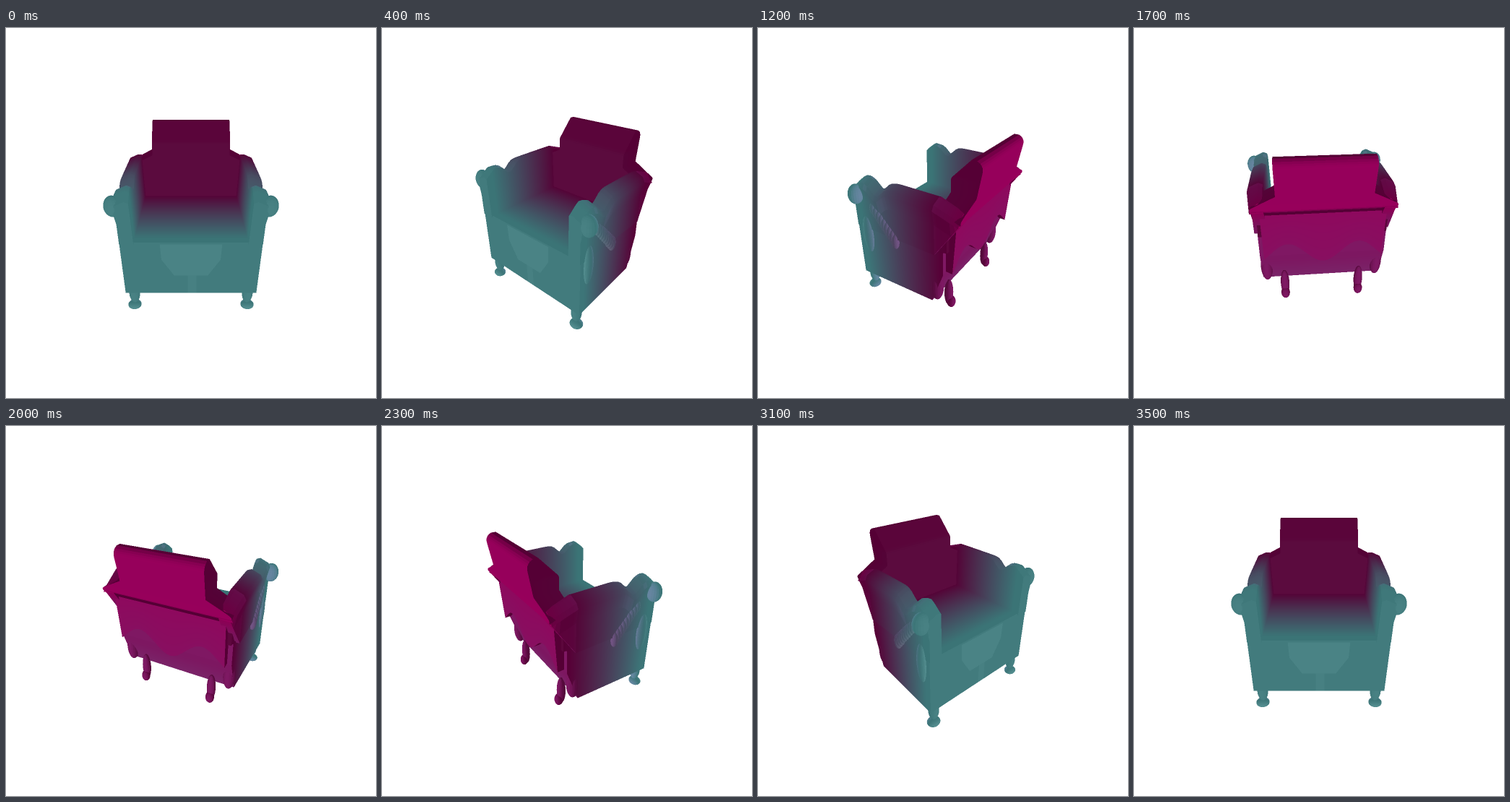
These frames come from a looping animation (512x512 px, 3.6 s). An HTML page with a canvas:

```html
<!DOCTYPE html>
<html lang="en">
<head>
<meta charset="utf-8">
<title>Turning armchair</title>
<style>
html, body { margin: 0; width: 100%; height: 100%; overflow: hidden; background: #fff; }
canvas { display: block; width: 512px; height: 512px; }
</style>
</head>
<body>
<canvas id="stage" width="512" height="512"></canvas>
<script>
const SIZE = 512, SCALE = 2, N = SIZE * SCALE;
const DIST = 450, TILT = Math.PI / 6;
const STEP = 100, STEPS = 36;
const TEAL = [59, 116, 118], MAGENTA = [85, 0, 53];
const triangles = [];

const sub = (a, b) => a.map((v, i) => v - b[i]);
const dot = (a, b) => a[0] * b[0] + a[1] * b[1] + a[2] * b[2];
const cross = (a, b) => [
  a[1] * b[2] - a[2] * b[1], a[2] * b[0] - a[0] * b[2], a[0] * b[1] - a[1] * b[0]
];
const mean = pts => [0, 1, 2].map(k => pts.reduce((s, p) => s + p[k], 0) / pts.length);
const flip = ([x, y, z]) => [-x, y, z];
const ramp = (from, to, v) => Math.min(1, Math.max(0, (v - from) / (to - from)));
const bump = (at, width, v) => Math.exp(-(((v - at) / width) ** 2));
// Evenly spaced values from a to b, both included.
const span = (a, b, count) => Array.from({ length: count + 1 }, (_, i) => a + (b - a) * i / count);

// Teal in front, magenta behind; faces turned backwards glow, recesses there turn purple.
function shade(z, normal, glow) {
  const t = ramp(-50, 66, z);
  const [r, g, b] = MAGENTA.map((m, k) => m + (TEAL[k] - m) * t);
  const back = Math.max(0, -normal[2]);
  const recess = 24 * back * ramp(-72, -56, z);
  const light = Math.max(0, normal[2]) * (7 + glow);
  return [r + 66 * back - recess + light, g + recess + light, b + 38 * back + recess / 3 + light];
}

function addFace(pts, center, glow = 0) {
  let n = cross(sub(pts[2], pts[0]), sub(pts[3] || pts[0], pts[1]));
  const len = Math.hypot(...n);
  if (len < 1e-6) return;
  const sign = dot(n, sub(mean(pts), center)) < 0 ? -1 : 1;
  n = n.map(v => v * sign / len);
  const verts = pts.map(p => ({ p, c: shade(p[2], n, glow) }));
  for (let i = 2; i < verts.length; i++) triangles.push([verts[0], verts[i - 1], verts[i]]);
}

// Skin between consecutive closed rings, with both ends capped.
function loft(rings, glow) {
  const center = mean(rings.flat());
  for (let i = 1; i < rings.length; i++) {
    const a = rings[i - 1], b = rings[i];
    a.forEach((p, j) => {
      const k = (j + 1) % a.length;
      addFace([p, a[k], b[k], b[j]], center, glow);
    });
  }
  addFace(rings[0], center, glow);
  addFace(rings[rings.length - 1], center, glow);
}

function loftPair(rings, glow) {
  loft(rings, glow);
  loft(rings.map(r => r.map(flip)), glow);
}

function blobPair([x, y, z], [rx, ry, rz], glow) {
  loftPair(span(0.03, Math.PI - 0.03, 14).map(a => span(0, Math.PI * 1.9, 19).map(b => [
    x + rx * Math.sin(a) * Math.cos(b), y + ry * Math.cos(a), z + rz * Math.sin(a) * Math.sin(b)
  ])), glow);
}

function buildSeat() {
  loft(span(75, -53, 32).map(z => {
    const w = 85 - 5 * ramp(75, -53, z), lo = -77 + 3 * Math.max(0, -37 - z);
    return [[-w, lo, z], [w, lo, z], [w, 3, z], [-w, 3, z]];
  }));
  const half = [[37, 1, 75.6], [36, -22, 75.6], [21, -47, 75.6]];
  addFace([...half, ...half.map(flip).reverse()], [0, 0, 0], 8);
  addFace([[-4, -47, 75.6], [-4, -76, 75.6], [7, -76, 75.6], [7, -47, 75.6]], [0, 0, 0], 5);
}

function buildArms() {
  loftPair(span(76, -74, 30).map(z => {
    const rear = ramp(-44, -74, z);
    const inner = 69 - 13 * bump(38, 11, z) - 13 * ramp(62, 78, z) - 11 * rear;
    const outer = inner - 7 - 2 * rear;
    const lo = 46 * rear, w = 88 - 4 * rear;
    return [
      [68, lo, z], [69, inner - 2, z], [74, inner, z], [w - 3, outer + 2, z],
      [w, outer - 4, z], [w - 3, Math.max(lo, outer - 22), z], [w - 3, lo, z]
    ];
  }));
  blobPair([89, 48, 68], [10, 13, 9], 6);
  blobPair([84, -10, 60], [4, 28, 9], 24);
  // Carved ridge sweeping down the side
  for (const t of span(0, 1, 8)) {
    blobPair([84, 32 - 36 * t, 46 - 32 * t], [4 + t, 9 + 2 * t, 5], 22);
  }
}

function buildBack() {
  loft(span(3, 109, 53).map(y => {
    const w = 79 + 4 * ramp(38, 50, y) - 29 * ramp(52, 67, y);
    const crown = 12 * (1 - Math.sqrt(1 - ramp(98, 109.5, y) ** 2));
    const front = -46 - 0.95 * Math.max(0, y - 84);
    const back = -57 - 19 * ramp(36, 48, y) - 0.16 * Math.max(0, y - 56) + crown;
    return [[-w, y, front], [w, y, front], [w, y, back], [-w, y, back]];
  }));
  // Scalloped trim
  loft(span(-74, 74, 37).map(x => {
    const lo = -20 - 14 * Math.cos(x / 14);
    return [[x, 38, -66], [x, lo, -62], [x, lo, -50], [x, 38, -50]];
  }));
  blobPair([74, -56, -40], [8, 22, 9]);
}

function buildFeet() {
  blobPair([75, -84, 68], [7, 15, 7], 6);
  blobPair([76, -103, 69], [9, 5, 8], 20);
  blobPair([51, -84, -43], [6, 22, 6]);
  blobPair([51, -98, -47], [6, 9, 6]);
}

const ctx = document.getElementById("stage").getContext("2d");
const buffer = document.createElement("canvas");
buffer.width = buffer.height = N;
const bufferCtx = buffer.getContext("2d");
const image = bufferCtx.createImageData(N, N);
const depth = new Float32Array(N * N);

function project([x, y, z], angle) {
  const c = Math.cos(angle), s = Math.sin(angle);
  const u = x * c - z * s, q = x * s + z * c;
  const v = y * Math.cos(TILT) - q * Math.sin(TILT);
  const k = DIST / (DIST - y * Math.sin(TILT) - q * Math.cos(TILT));
  return [(256 + u * k) * SCALE, (256 - v * k) * SCALE, k];
}

function fillTriangle(verts, angle) {
  const [a, b, c] = verts.map(v => project(v.p, angle));
  const [ca, cb, cc] = verts.map(v => v.c);
  const area = (b[0] - a[0]) * (c[1] - a[1]) - (b[1] - a[1]) * (c[0] - a[0]);
  if (Math.abs(area) < 1e-6) return;
  const x0 = Math.max(0, Math.floor(Math.min(a[0], b[0], c[0])));
  const x1 = Math.min(N - 1, Math.ceil(Math.max(a[0], b[0], c[0])));
  const y0 = Math.max(0, Math.floor(Math.min(a[1], b[1], c[1])));
  const y1 = Math.min(N - 1, Math.ceil(Math.max(a[1], b[1], c[1])));
  for (let y = y0; y <= y1; y++) {
    for (let x = x0; x <= x1; x++) {
      const px = x + 0.5, py = y + 0.5;
      const wa = ((b[0] - px) * (c[1] - py) - (b[1] - py) * (c[0] - px)) / area;
      const wb = ((c[0] - px) * (a[1] - py) - (c[1] - py) * (a[0] - px)) / area;
      const wc = 1 - wa - wb;
      if (wa < 0 || wb < 0 || wc < 0) continue;
      const k = wa * a[2] + wb * b[2] + wc * c[2], i = y * N + x;
      if (k <= depth[i]) continue;
      depth[i] = k;
      for (let n = 0; n < 3; n++) image.data[i * 4 + n] = wa * ca[n] + wb * cb[n] + wc * cc[n];
      image.data[i * 4 + 3] = 255;
    }
  }
}

function draw(step) {
  const angle = step * 2 * Math.PI / (STEPS - 1);
  depth.fill(0);
  image.data.fill(0);
  for (const t of triangles) fillTriangle(t, angle);
  bufferCtx.putImageData(image, 0, 0);
  ctx.fillStyle = "#fff";
  ctx.fillRect(0, 0, SIZE, SIZE);
  ctx.drawImage(buffer, 0, 0, SIZE, SIZE);
}

let start = null, shown = 0;
function tick(now) {
  if (start === null) start = now;
  const step = Math.floor((now - start) / STEP) % STEPS;
  if (step !== shown) draw(shown = step);
  requestAnimationFrame(tick);
}

buildSeat();
buildArms();
buildBack();
buildFeet();
draw(0);
requestAnimationFrame(tick);
</script>
</body>
</html>
```
